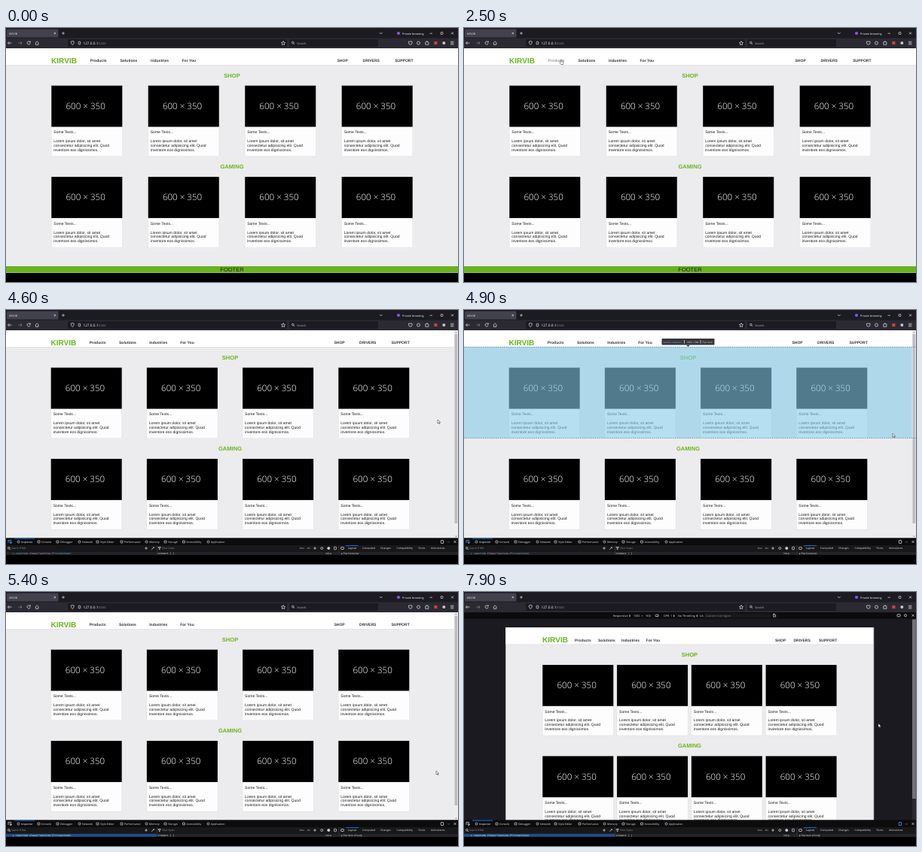
These frames come from a looping animation (600x338 px, 8 s). An HTML page:

```html
<!DOCTYPE html>
<html lang="en">
<head>
<meta charset="utf-8">
<title>Responsive page demo</title>
<style>
  html, body { margin: 0; width: 100%; height: 100%; overflow: hidden; background: #000; }
  svg { display: block; width: 100%; height: 100%; text-rendering: geometricPrecision; }
  text { white-space: pre; }
  .page { font-family: "Liberation Sans", Arial, sans-serif; font-size: 5.04px; fill: #1c1c1c; }
  .ui { font-family: "Open Sans", "Noto Sans", sans-serif; font-size: 4px; fill: #e4e4e8; }
  .mono { font-family: "DejaVu Sans Mono", monospace; font-size: 3.3px; }
  .bold { font-weight: 700; }
  .mid { text-anchor: middle; }
  .nav { fill: #333; }
  .brand { font-size: 10.08px; fill: #68b61e; }
  .heading { font-size: 7.56px; fill: #68b61e; }
  .thumb { font-family: "Open Sans", sans-serif; font-weight: 300; font-size: 11.6px; fill: #fff; }
  .line { fill: none; stroke: #d0d0d6; stroke-width: .8; }
</style>
</head>
<body>
<svg id="stage" viewBox="0 0 600 338" preserveAspectRatio="none"></svg>
<script>
const LOOP = 8000, STEP = 100;
const stage = document.getElementById('stage');

function add(parent, tag, attrs = {}, content) {
  const el = document.createElementNS('http://www.w3.org/2000/svg', tag);
  for (const key in attrs) el.setAttribute(key, attrs[key]);
  if (content !== undefined) el.textContent = content;
  parent.append(el);
  return el;
}
const group = (parent, cls = '') => add(parent, 'g', { class: cls });
const rect = (g, x, y, width, height, fill, more) =>
  add(g, 'rect', { x, y, width, height, fill, ...more });
const text = (g, x, y, str, cls = '', more) =>
  add(g, 'text', { x, y, class: cls, ...more }, str);
const line = (g, d, more) => add(g, 'path', { d, class: 'line', ...more });
const dot = (g, cx, cy, r, more) => add(g, 'circle', { cx, cy, r, class: 'line', ...more });
const cross = (g, x, y, r = 1.5) =>
  line(g, `M${x - r} ${y - r}l${2 * r} ${2 * r}m0 ${-2 * r}l${-2 * r} ${2 * r}`);
const plus = (g, x, y, r = 1.8) => line(g, `M${x - r} ${y}h${2 * r}M${x} ${y - r}v${2 * r}`);
const lens = (g, x, y) => {
  dot(g, x, y, 1.3, { 'stroke-width': .6 });
  line(g, `M${x + 1} ${y + 1}l1.2 1.2`);
};
const box = (g, x, y, w = 3.6, h = 3.6) =>
  rect(g, x - w / 2, y - h / 2, w, h, 'none', { class: 'line', rx: .5 });

function drawBrowser() {
  const g = group(stage, 'ui');
  rect(g, 0, 0, 600, 14, '#1c1b22');
  rect(g, 0, 13.5, 600, 13.5, '#2b2a33');
  rect(g, 1, 1.5, 68.5, 11, '#42414d', { rx: 1.2 });
  text(g, 4, 8.5, 'KIRVIB', '', { 'font-size': 3.7 });
  cross(g, 64.8, 7, 1.2);
  plus(g, 76, 7);
  line(g, 'M496 6l1.8 1.8 1.8-1.8');
  dot(g, 521, 7, 2.1, { style: 'fill:#8a55e8;stroke:none' });
  text(g, 526, 8.5, 'Private browsing', '', { 'font-size': 3.7, fill: '#fbfbfe' });
  line(g, 'M562.5 7.2h3.4');
  box(g, 578.5, 7, 2.8, 2.8);
  cross(g, 592.5, 7);

  line(g, 'M7.5 20h-5m2-2l-2 2 2 2');
  line(g, 'M16 20h5m-2-2l2 2-2 2', { opacity: .45 });
  line(g, 'M32 18.8a2.1 2.1 0 1 0 .2 1.6M32.3 17.3v1.7h-1.7');
  line(g, 'M38.8 20l2.4-2.2 2.4 2.2M39.6 20v2.3h3.2v-2.3');
  rect(g, 82, 15, 291, 10, '#1c1b22', { rx: 1.2 });
  line(g, 'M86.3 18l2-.7 2 .7c0 2-.6 3.6-2 4.4-1.4-.8-2-2.4-2-4.4z', { 'stroke-width': .6 });
  box(g, 97.5, 20, 2.6, 3.6);
  text(g, 102.5, 21.8, '127.0.0.1', '', { 'font-size': 4.7, fill: '#fbfbfe' });
  text(g, 122, 21.8, ':5500', '', { 'font-size': 4.2, fill: '#85848d' });
  line(g, 'M368 17.5l.8 1.7 1.8.2-1.3 1.3.3 1.8-1.6-.9-1.6.9.3-1.8-1.3-1.3 1.8-.2z',
    { 'stroke-width': .6 });
  rect(g, 376, 15, 118, 10, '#1c1b22', { rx: 1.2 });
  lens(g, 380.8, 19.5);
  text(g, 386, 21.5, 'Search', '', { fill: '#a8a7ae' });
  line(g, 'M534.5 18h4.5v1.8a2.2 2.2 0 0 1-4.5 0z');
  dot(g, 547.5, 20, 2);
  line(g, 'M556.8 18.8h1.2v-1h1.6v1h1.3v3.4h-4.1z');
  rect(g, 568.3, 17.8, 4.2, 4.2, '#d23b3b');
  dot(g, 581.3, 20, 2, { style: 'fill:#c7c7cc;stroke:none' });
  line(g, 'M590 18.2h4.4m-4.4 1.8h4.4m-4.4 1.8h4.4');
}

const LOREM = ['Lorem ipsum dolor, sit amet', 'consectetur adipisicing elit. Quod',
  'inventore eos dignissimos.'];
const LINKS = ['Products', 'Solutions', 'Industries', 'For You', 'SHOP', 'DRIVERS', 'SUPPORT'];
const CARD_WIDTH = 94.6;

function drawCard(g, x, y) {
  rect(g, x + .15, y - .15, CARD_WIDTH - .3, 94.1, '#fdfdfd',
    { stroke: '#d3d2d5', 'stroke-width': .32 });
  rect(g, x + .3, y, CARD_WIDTH - .6, 54.8, '#000');
  text(g, x + 45.6, y + 31.3, '600 × 350', 'thumb mid');
  text(g, x + 3.3, y + 63.6, 'Some Texts...');
  LOREM.forEach((str, i) => text(g, x + 3.3, y + 75.4 + i * 5.75, str));
}

// The cards share a centred container with equal gaps between them.
function drawPage({ x, y, width, left, links }) {
  const g = group(stage, 'page');
  const center = x + width / 2;
  const pitch = (2 * (center - left) - CARD_WIDTH) / 3;
  rect(g, x, y, width, 299, '#ecebed');
  rect(g, x, y, width, 22.5, '#fff');
  rect(g, x, y + 22.3, width, .6, '#d9d8dc');
  text(g, left, y + 20.1, 'KIRVIB', 'brand bold');
  g.links = LINKS.map((str, i) => text(g, links[i], y + 18.2, str, 'bold nav'));
  ['SHOP', 'GAMING'].forEach((title, row) => {
    const top = y + 49.7 + row * 121.4;
    text(g, center, top - 11, title, 'heading bold mid');
    for (let i = 0; i < 4; i++) drawCard(g, left + i * pitch, top);
  });
  return g;
}

function drawFullPage() {
  const g = drawPage({ x: 0, y: 27, width: 600, left: 60,
    links: [111.8, 151.5, 192, 233.5, 439.5, 473.6, 516.2] });
  rect(g, 0, 317, 600, 8.7, '#68b220');
  text(g, 300, 324.1, 'FOOTER', 'mid', { 'font-size': 7.56 });
  return g;
}

function drawInspectedPage() {
  const g = drawPage({ x: 0, y: 27, width: 595, left: 59.4,
    links: [110.7, 150, 190.2, 231.2, 435.4, 469, 511.4] });
  rect(g, 594.7, 27, 5.3, 277, '#ededef');
  rect(g, 595.5, 32, 3.7, 252, '#bdbdc1');
  line(g, 'M596.2 30.3l1.2-1.2 1.2 1.2M596.2 300.6l1.2 1.2 1.2-1.2', { style: 'stroke:#666' });
  return g;
}

function drawHighlight() {
  const g = group(stage, 'ui');
  rect(g, 0, 49.3, 594.7, 121, '#87ceeb', { opacity: .6 });
  line(g, 'M0 49.3h600M0 170.4h600',
    { style: 'stroke:#4f86a4', 'stroke-width': .6, 'stroke-dasharray': '1.6 1.2' });
  rect(g, 262.5, 38, 70, 8.5, '#38383d', { rx: .8 });
  line(g, 'M295 46.5h5l-2.5 2.4z', { style: 'fill:#38383d;stroke:none' });
  const small = { 'font-size': 3.1 };
  text(g, 264.5, 43.5, 'section', '', { ...small, fill: '#b98eff' });
  text(g, 275.6, 43.5, '.section-1', '', { ...small, fill: '#75bfff' });
  text(g, 295.5, 43.5, '1903 × 388', '', small);
  text(g, 316.5, 43.5, 'Flex Item', '', small);
  line(g, 'M292.5 40v4.5M314 40v4.5', { 'stroke-width': .3 });
  return g;
}

function drawResponsive() {
  const g = group(stage, 'ui');
  rect(g, 0, 27, 600, 277, '#1b1a20');
  rect(g, 0, 27, 600, 8.5, '#0c0c0d');
  const label = (x, str, more) => text(g, x, 32.7, str, '', { 'font-size': 3.7, ...more });
  g.device = label(198, 'Responsive ⬍');
  label(225, '1582');
  label(235.3, '×');
  label(241.5, '900');
  line(g, 'M254 32.5h4v-2.3h-2.6M254 31.8v-1l1.2-1.2');
  g.ratio = label(265, 'DPR: 1 ⬍');
  label(284, 'No Throttling ⬍');
  label(312.5, 'UA:');
  rect(g, 319, 28.3, 88, 6, '#18181a');
  label(321, 'Custom User Agent', { fill: '#8a8a90' });
  line(g, 'M410.7 29v4h3v-2.3h-1.6V29z');
  box(g, 577, 31.2, 4, 3);
  dot(g, 586, 31.2, 1.5);
  cross(g, 596, 31.2);
  rect(g, 594.8, 36, 5.2, 268, '#2a2a2e');
  rect(g, 595, 36.5, 4.8, 238.5, '#737378');
  g.append(drawPage({ x: 55.3, y: 47.3, width: 488.3, left: 104,
    links: [147, 178, 209, 241.6, 413, 437.4, 471] }));
  g.size = text(g, 543, 52.5, '1582px × 900px', '',
    { 'font-size': 3.4, fill: '#4a4a4f', 'text-anchor': 'end' });
  g.bar = rect(g, 542.8, 47.3, 1.4, 257, '#d4d3d8');
  return g;
}

const TOOLS = [[20, 'Inspector'], [47, 'Console'], [72, 'Debugger'], [101, 'Network'],
  [125, 'Style Editor'], [157, 'Performance'], [190, 'Memory'], [215, 'Storage'],
  [239.5, 'Accessibility'], [272, 'Application']];
const SIDE = [[454, 'Layout'], [473, 'Computed'], [497, 'Changes'], [518.5, 'Compatibility'],
  [547.5, 'Fonts'], [564, 'Animations']];

function drawDevtools() {
  const g = group(stage, 'ui');
  rect(g, 0, 303.3, 600, 22.7, '#0c0c0d');
  rect(g, 0, 313, 600, 8, '#18181a');
  rect(g, 0, 321.5, 600, 4.5, '#232327');
  g.picker = line(g, 'M3 310v-3.6h4.5M5 308l3 1.2-1.3.5-.6 1.3z');
  rect(g, 11, 303.6, 27, .9, '#0a84ff');
  TOOLS.forEach(([x, str], i) => {
    const style = i ? '' : 'fill:#fff';
    if (i % 3 === 0) dot(g, x - 3.5, 308.5, 1.5, { 'stroke-width': .7 });
    else box(g, x - 3.5, 308.5, 3, 2.8);
    text(g, x, 310, str, '', { 'font-size': 3.55, style });
  });
  g.device = box(g, 579, 308.5, 3.4, 4);
  text(g, 585.5, 310, '•••', '', { 'font-size': 3 });
  cross(g, 596, 308.5);

  const tiny = { 'font-size': 3.2 };
  lens(g, 3.8, 316.7);
  text(g, 7, 318.3, 'Search HTML', '', { ...tiny, fill: '#9a9aa0' });
  plus(g, 186, 317);
  line(g, 'M193.3 318.8l3.2-3.2m-1.2-.5l1.8 1.8');
  line(g, 'M202 315.5h3.4l-1.3 1.6v1.6h-.8v-1.6z', { 'stroke-width': .5 });
  text(g, 207, 318.3, 'Filter Styles', '', { ...tiny, fill: '#9a9aa0' });
  text(g, 389.5, 318.3, ':hov', '', tiny);
  text(g, 399, 318.3, '.cls', '', tiny);
  plus(g, 410, 317);
  dot(g, 419.3, 317, 1.5);
  dot(g, 428.3, 317, 1.6, { style: 'fill:#d0d0d6' });
  box(g, 437, 317, 2.8, 3.6);
  box(g, 446.5, 317, 3.6, 3);
  rect(g, 451, 313, 17, .8, '#0a84ff');
  SIDE.forEach(([x, str], i) =>
    text(g, x, 318.4, str, '', { 'font-size': 3.5, style: i ? '' : 'fill:#fff' }));

  g.row = rect(g, 0, 321.8, 200, 3.8, '#204e8a');
  const code = text(g, 9, 325, '', 'mono');
  [['▸ <section ', '#75bfff'], ['class', '#ff97e9'], ['="section-2"', '#c9a6ff'],
    ['></section>', '#75bfff']].forEach(([str, fill]) => add(code, 'tspan', { fill }, str));
  g.code = code;
  text(g, 201.5, 325, 'element { }', 'mono');
  text(g, 424, 325, 'inline', '', tiny);
  g.flex = text(g, 445, 325.3, '', '', tiny);
  line(g, 'M200.5 313v13M442 313v13', { style: 'stroke:#38383d', 'stroke-width': .5 });
  return g;
}

function drawCursor(d) {
  return add(stage, 'path', { d, fill: '#fff', stroke: '#222', 'stroke-width': .5,
    'stroke-linejoin': 'round' });
}

drawBrowser();
const full = drawFullPage();
const inspected = drawInspectedPage();
const highlight = drawHighlight();
const responsive = drawResponsive();
const devtools = drawDevtools();
rect(stage, 0, 326, 600, 12, '#000');
const arrow = drawCursor('M0 0v5l1.2-1.1.8 1.8.9-.4-.8-1.7h1.6z');
const hand = drawCursor('M1 .5q.7-.8 1.2 0v2l2.4.5q.6.2.5 1l-.5 2.5H1.8L0 4.2q.1-.8 1 0z');
const linkBoxes = full.links.map(el => el.getBBox());

// time, x, y of the pointer tip
const PATH = [
  [600, 590, 113], [1000, 534, 56], [1100, 534, 56], [1200, 530, 43], [1500, 485, 43],
  [1700, 446, 43], [2000, 402, 44], [2200, 240, 43], [2300, 200, 43], [2400, 162, 43],
  [2500, 127, 42], [2600, 126, 43], [2900, 370, 148], [3000, 373, 148], [3400, 450, 158],
  [3800, 523, 160], [4300, 573, 146], [4700, 573, 146], [4900, 569, 164.3],
  [5100, 569.5, 166], [5400, 571, 238], [5700, 578.3, 306.5], [6500, 578.3, 306.5],
  [6600, 573, 296], [7100, 549, 190], [7200, 549, 190], [7300, 554, 186], [7900, 550, 175]
];

function pointerAt(t) {
  const i = PATH.findIndex(p => p[0] > t);
  if (i < 0) return PATH[PATH.length - 1].slice(1);
  if (i === 0) return PATH[0].slice(1);
  const [t0, x0, y0] = PATH[i - 1], [t1, x1, y1] = PATH[i];
  const k = (t - t0) / (t1 - t0);
  return [x0 + (x1 - x0) * k, y0 + (y1 - y0) * k];
}

const show = (el, on) => { el.style.display = on ? '' : 'none'; };

function render(t) {
  const open = t >= 4500, picked = t >= 5100, mobile = t >= 5800, ready = t >= 6400;
  show(full, !open);
  show(inspected, open && !mobile);
  show(highlight, t >= 4800 && !picked);
  show(responsive, mobile);
  show(devtools, open);
  show(devtools.row, picked);
  devtools.flex.textContent = picked ? '▸ Flex Item of body' : '▸ Flex Container';
  devtools.picker.style.stroke = open && !picked ? '#4aa8ff' : '';
  devtools.device.style.stroke = mobile ? '#4aa8ff' : '';
  for (const part of devtools.code.children) part.style.fill = picked ? '#fff' : '';
  responsive.device.style.opacity = responsive.ratio.style.opacity = ready ? 1 : .4;
  show(responsive.size, t < 7300);
  show(responsive.bar, t >= 6600);

  const [x, y] = pointerAt(t);
  const over = open ? -1 : linkBoxes.findIndex(b =>
    x >= b.x && x <= b.x + b.width && y >= b.y && y <= b.y + b.height);
  full.links.forEach((el, i) => { el.style.fill = i === over ? '#999' : ''; });
  show(arrow, t >= 600 && over < 0);
  show(hand, t >= 600 && over >= 0);
  for (const el of [arrow, hand]) el.setAttribute('transform', `translate(${x} ${y})`);
}

const start = performance.now();
function tick() {
  const t = (performance.now() - start) % LOOP;
  render(Math.floor(t / STEP) * STEP);
  requestAnimationFrame(tick);
}
tick();
</script>
</body>
</html>
```
